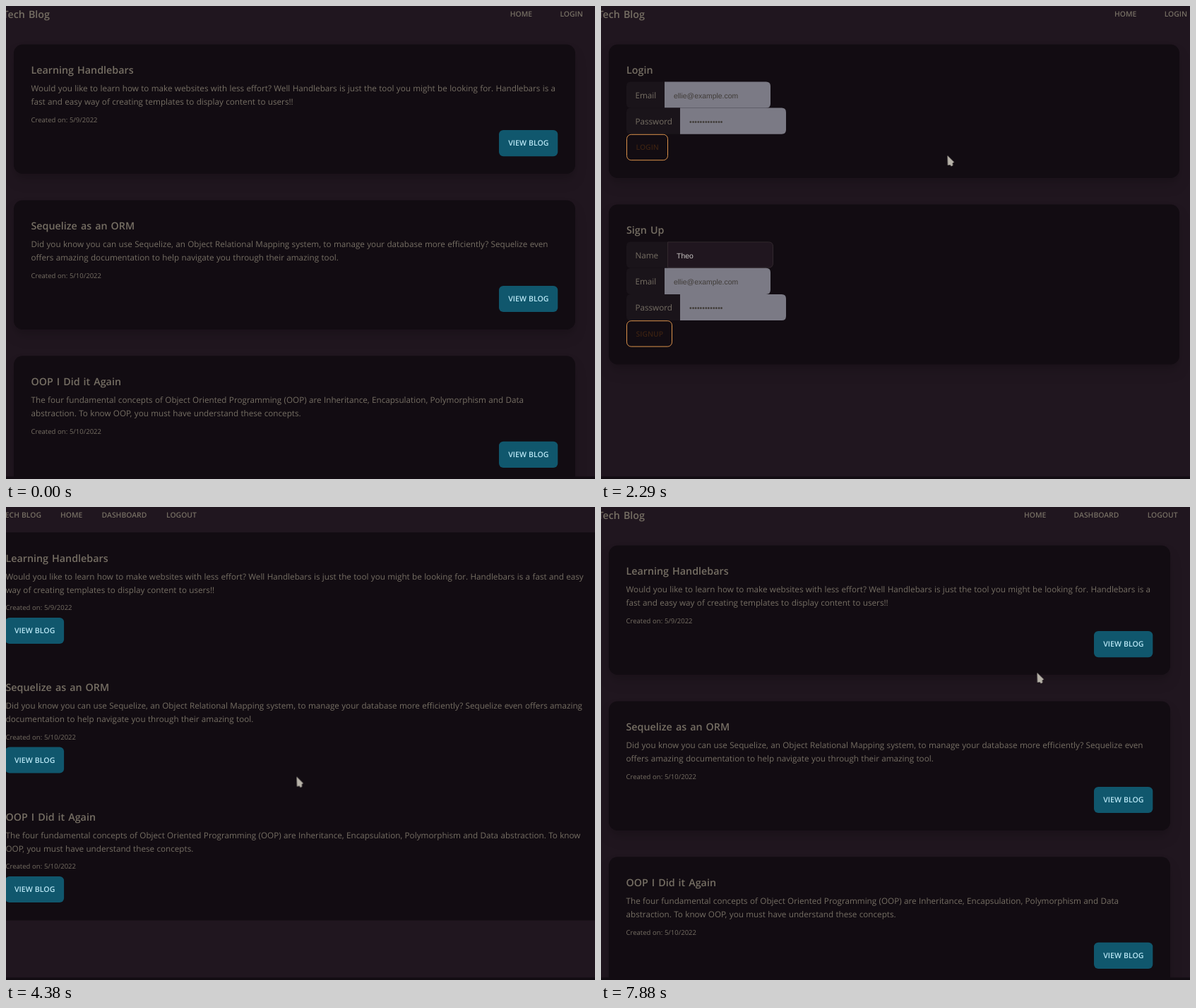
An HTML page for the animation above (8000 ms loop, 834 by 671 pixels).

```html
<!DOCTYPE html>
<html lang="en">
<head>
<meta charset="utf-8">
<title>Tech Blog</title>
<style>
  html, body { margin: 0; width: 100%; height: 100%; overflow: hidden; background: #20161f; }
  svg { display: block; width: 834px; height: 671px; }
  text { font: 11.7px "Open Sans", "Noto Sans", sans-serif; word-spacing: .3px; fill: #756e63;
         text-rendering: geometricPrecision; white-space: pre; }
  .title { font-size: 14.3px; font-weight: 600; word-spacing: 1.3px; }
  .small { font-size: 9.5px; }
  .caps { font-size: 10.4px; font-weight: 600; }
  .view { font-size: 10.6px; font-weight: 600; fill: #b9e7f5; }
  .field { font: 10.45px "Liberation Sans", Arial, sans-serif; }
  .page { fill: #20161f; }
  .dark { fill: #120c12; }
  .card { fill: #120c12;
          filter: drop-shadow(0 5px 3px rgba(0, 0, 0, .08)) drop-shadow(0 11px 8px rgba(0, 0, 0, .1)); }
  .accent { fill: #10576d; }
  .label { fill: #1a141a; }
  .outline { fill: transparent; stroke: #db924b; }
  .brown { fill: #3a2112; }
  .hover { fill: #31282d; }
  .pointer { fill: #b7b3a9; }

  /* screens and states switch hard */
  #home, #navOut, #navIn, #login, #bare, #linkHover, #arrow, #hand, #beam, #loginBtn {
    animation: 8s step-end infinite;
  }
  #home { animation-name: home; }
  #navOut { animation-name: navOut; }
  #navIn { animation-name: navIn; }
  #login { animation-name: login; }
  #bare { animation-name: bare; }
  #linkHover { animation-name: linkHover; }
  #arrow { animation-name: arrow; }
  #hand { animation-name: hand; }
  #beam { animation-name: beam; }
  #loginBtn { animation-name: press; }
  @keyframes home { 0%, 55.6% { opacity: 1 } 27.5% { opacity: 0 } 100% { opacity: 1 } }
  @keyframes navOut { 0% { opacity: 1 } 27.5%, 100% { opacity: 0 } }
  @keyframes navIn { 0% { opacity: 0 } 55.6%, 100% { opacity: 1 } }
  @keyframes login { 0%, 54.2%, 100% { opacity: 0 } 27.5% { opacity: 1 } }
  @keyframes bare { 0%, 55.6%, 100% { opacity: 0 } 54.2% { opacity: 1 } }
  @keyframes linkHover { 0%, 24.9%, 100% { opacity: 0 } 18.3% { opacity: 1 } }
  @keyframes arrow { 0%, 18.3%, 33%, 100% { opacity: 0 } 2.25%, 24.9%, 52.5% { opacity: 1 } }
  @keyframes hand { 0%, 24.9%, 52.5%, 100% { opacity: 0 } 18.3%, 46.5% { opacity: 1 } }
  @keyframes beam { 0%, 46.5%, 100% { opacity: 0 } 33% { opacity: 1 } }
  @keyframes press { 0%, 52.5%, 100% { fill: transparent } 46.5% { fill: #db924b } }

  /* autofilled inputs fade in */
  .filled { animation: fillIn 8s linear infinite; }
  .typed { animation: textIn 8s linear infinite; }
  .name { animation: nameIn 8s step-end infinite; }
  @keyframes fillIn {
    0%, 27.5% { fill: #20161f }
    28.6%, 29.4% { fill: #7b7a85 }
    30.4%, 100% { fill: #e8f0fe }
  }
  @keyframes textIn {
    0%, 27.5% { fill: #756e63 }
    28.6%, 29.4% { fill: #403c38 }
    30.4%, 100% { fill: #000 }
  }
  @keyframes nameIn { 0% { fill: #c8c4c2 } 30.4%, 100% { fill: #a8a29e } }

  #cursor { animation: move 8s linear infinite; }
  @keyframes move {
    0%, 2.25% { transform: translate(778px, 555px) }
    8%, 9.75% { transform: translate(525px, 181px) }
    11.25% { transform: translate(516px, 168px) }
    19.25%, 24.4% { transform: translate(791px, 13px) }
    28.6%, 29.4% { transform: translate(490.5px, 212px) }
    30.4% { transform: translate(371px, 223px) }
    38.5%, 41.5% { transform: translate(187px, 130px) }
    49%, 52.1% { transform: translate(94px, 197px) }
    54.7%, 55.5% { transform: translate(411.5px, 382.5px) }
    60%, 63.3% { transform: translate(617.5px, 355.5px) }
    67.5% { transform: translate(532px, 310px) }
    72.1%, 73.75% { transform: translate(579px, 264px) }
    83.4%, 84.2% { transform: translate(615.5px, 235px) }
    87.5% { transform: translate(616.5px, 235px) }
    90%, 100% { transform: translate(617.5px, 235px) }
  }
</style>
</head>
<body>
<svg id="stage" viewBox="0 0 834 671"></svg>
<script>
const R = 6.2;
const posts = [
  ['Learning Handlebars', '5/9/2022',
    'Would you like to learn how to make websites with less effort? Well Handlebars is just the tool you might be looking for. Handlebars is a|fast and easy~way of creating templates to display content to users!!'],
  ['Sequelize as an ORM', '5/10/2022',
    'Did you know you can use Sequelize, an Object Relational Mapping system, to manage your database more efficiently? Sequelize even|offers amazing~documentation to help navigate you through their amazing tool.'],
  ['OOP I Did it Again', '5/10/2022',
    'The four fundamental concepts of Object Oriented Programming (OOP) are Inheritance, Encapsulation, Polymorphism and Data|abstraction. To know~OOP, you must have understand these concepts.']
];

const text = (x, y, s, cls = '', extra = '') =>
  `<text x="${x}" y="${y}" class="${cls}" ${extra}>${s}</text>`;
const box = (x, y, w, h, r, cls, id = '') =>
  `<rect x="${x}" y="${y}" width="${w}" height="${h}" rx="${r}" class="${cls}" id="${id}"/>`.replace(' id=""', '');
const group = (id, body) => `<g id="${id}">${body}</g>`;
const brand = text(62, 17, 'Tech Blog', 'title', 'text-anchor="end"');
const nav = (y, ...items) => items.map(([x, s]) => text(x, y, s, 'caps')).join('');
const strip = box(0, 667.5, 834, 4, 0, 'dark');

// rectangle with only its left or right corners rounded
function half(x, y, w, h, left, cls, stroke = '') {
  const a = left ? x + w : x, d = left ? -1 : 1, e = a + d * w, c = e - d * R;
  return `<path class="${cls}" ${stroke} d="M${a} ${y}H${c}Q${e} ${y} ${e} ${y + R}V${y + h - R}Q${e} ${y + h} ${c} ${y + h}H${a}Z"/>`;
}

// one blog entry, with its title's baseline at y
function post([title, date, body], x, y, cut, bx) {
  const [a, b] = body.split(cut).map(s => s.replace(/[|~]/, ' '));
  const by = y + (cut === '|' ? 79.8 : 79.4);
  return text(x, y, title, 'title') + text(x, y + 25, a) + text(x, y + 44, b) +
    text(x, y + 68.7, 'Created on: ' + date, 'small') +
    box(bx, by, 83.3, 37.2, R, 'accent') + text(bx + 13.2, by + 22.4, 'VIEW BLOG', 'view');
}

function row(y, label, split, value, cls) {
  const plain = cls === 'name';
  const input = plain
    ? half(split + .5, y + .5, 149, 36.2, false, 'page', 'stroke="#31282d"')
    : half(split, y, 150, 37.2, false, 'filled');
  return half(36, y, split - 36, 37.2, true, 'label') + text(48.4, y + 23.5, label) +
    input + text(split + 13, y + 23.4, value, 'field ' + cls);
}

const credentials = y =>
  row(y, 'Email', 90, 'ellie@example.com', 'typed') +
  row(y + 37.2, 'Password', 112, '•'.repeat(13), 'typed');

const home = posts.map((p, i) => {
  const y = i * 220.9;
  return box(11, 54.5 + y, 795, 183.5, 12.4, 'card') + post(p, 35.5, 96.2 + y, '|', 698);
}).join('');

const login = brand + nav(14.8, [727, 'HOME'], [797.7, 'LOGIN']) +
  box(11, 54.5, 808, 189.5, 12.4, 'card') + text(36, 96.2, 'Login', 'title') + credentials(107.4) +
  box(36.5, 182.3, 58, 36.4, R, 'outline', 'loginBtn') + text(49.5, 204.4, 'LOGIN', 'caps brown') +
  box(11, 281.5, 808, 227, 12.4, 'card') + text(36, 323.2, 'Sign Up', 'title') +
  row(334.4, 'Name', 94, 'Theo', 'name') + credentials(371.7) +
  box(36.5, 446.7, 64, 36.4, R, 'outline') + text(49.5, 468.8, 'SIGNUP', 'caps brown') + strip;

const bare = box(0, 36, 834, 550.5, 0, 'dark') +
  text(50, 15, 'TECH BLOG', 'caps', 'text-anchor="end"') +
  nav(15, [77, 'HOME'], [135.6, 'DASHBOARD'], [227, 'LOGOUT']) +
  posts.map((p, i) => post(p, -.5, 77.5 + i * 183.5, '~', -1.2)).join('') + strip;

const cursor =
  group('arrow', '<path class="pointer" d="M0 0L9.5 9.5L7.2 11L7.8 14L5.4 15.5L4 13.3L.5 14Z"/>') +
  group('hand', '<path class="pointer" d="M-1.7 1.5Q0-1 1.5 1.5V5.5L6.5 7Q8.3 8 7.8 11L6.5 15H0L-4.8 9.5Q-5 7.5-1.7 8.5Z"/>') +
  group('beam', '<path fill="none" stroke="#55585f" stroke-width="1.8" d="M-3-6H3M0-6V6M-3 6H3"/>');

document.getElementById('stage').innerHTML =
  box(0, 0, 834, 671, 0, 'page') +
  group('home', brand + home + strip) +
  group('navOut', box(770, -7, 61, 37, R, 'hover', 'linkHover') + nav(14.8, [713.7, 'HOME'], [784.4, 'LOGIN'])) +
  group('navIn', nav(14.8, [599, 'HOME'], [669.6, 'DASHBOARD'], [773.7, 'LOGOUT'])) +
  group('login', login) +
  group('bare', bare) +
  group('cursor', cursor);
</script>
</body>
</html>
```
